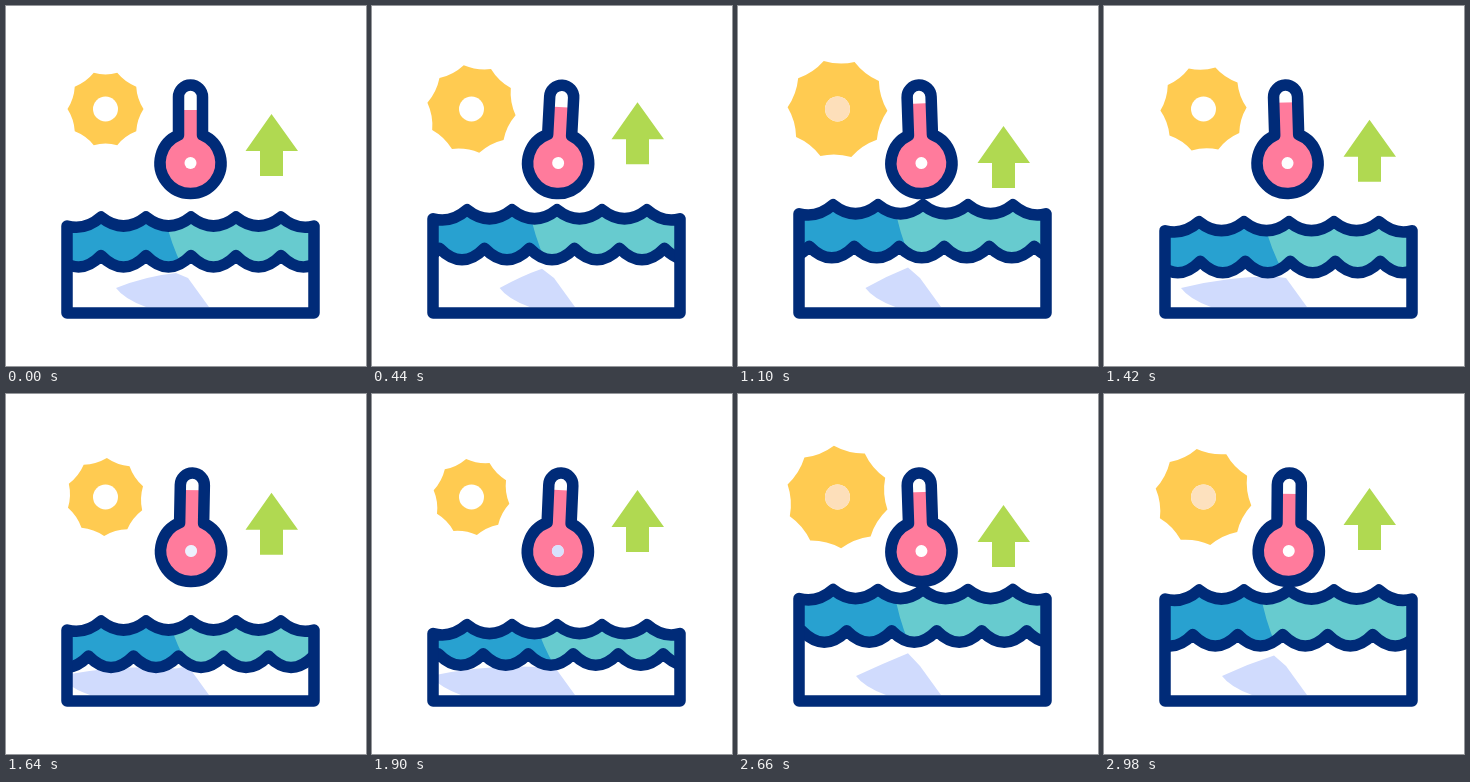
Recreate the animation shown at these times as an HTML page. Size 360 by 360 pixels, loop 3 s.

```html
<!DOCTYPE html>
<html lang="en">
<head>
<meta charset="utf-8">
<title>Rising water temperature</title>
<style>
  html, body { margin: 0; width: 100%; height: 100%; overflow: hidden; background: #fff; }
  svg { display: block; width: 100vw; height: 100vh; }
  .line { fill: none; stroke: #002b78; stroke-width: 11.5; stroke-linejoin: round; stroke-linecap: round; }
</style>
</head>
<body>
<svg viewBox="0 0 360 360">
  <defs>
    <clipPath id="tank"><rect x="61" y="180" width="247" height="121.5"/></clipPath>
    <clipPath id="sea"><path id="seaShape"/></clipPath>
  </defs>

  <g transform="translate(99.5 103)">
    <path id="sun" fill="#ffcb51"/>
    <circle r="12.5" fill="#fff"/>
    <circle id="glow" r="12.5" fill="#fddfba"/>
  </g>

  <path id="arrow" fill="#b0d951" d="M265.5 0L292 37H277V62H254V37H239.5Z"/>

  <g clip-path="url(#tank)">
    <path id="shade" fill="#d0dbfd"/>
    <g clip-path="url(#sea)">
      <rect x="55" y="180" width="260" height="130" fill="#67cbcf"/>
      <path fill="#28a1d0" d="M55 180H155V190Q164 255 203 301H55Z"/>
    </g>
    <path id="lower" class="line"/>
  </g>

  <g id="thermo">
    <path fill="#fff" d="M172.5 129V91a12 12 0 0 1 24 0V129Z"/>
    <rect id="mercury" x="173" width="23" fill="#ff7b9c"/>
    <circle cx="184.5" cy="157" r="30" fill="#ff7b9c"/>
    <path class="line" d="M172.5 129V91a12 12 0 0 1 24 0V129A30.5 30.5 0 1 1 172.5 129Z"/>
    <circle cx="184.5" cy="157" r="6" fill="#fff"/>
    <circle id="tint" cx="184.5" cy="157" r="6" fill="#d0dbfd"/>
  </g>

  <path id="frame" class="line"/>
</svg>
<script>
  const LOOP = 3000, STEP = 20, PITCH = 45;
  const set = (id, name, value) => document.getElementById(id).setAttribute(name, value);
  const ease = p => (1 - Math.cos(Math.PI * p)) / 2;
  const clamp = v => Math.max(0, Math.min(1, v));

  // Eased motion through poses spaced evenly in time.
  function beat(t, span, ...poses) {
    const i = Math.floor(t / span);
    return poses[i] + (poses[i + 1] - poses[i]) * ease(t / span - i);
  }

  function sunPath(r, turn) {
    const spot = (radius, deg) => {
      const a = deg * Math.PI / 180;
      return `${radius * Math.cos(a)} ${radius * Math.sin(a)}`;
    };
    let d = `M${spot(r, turn)}`;
    for (let a = turn; a < turn + 360; a += 36) {
      d += `Q${spot(r * 0.87, a + 18)} ${spot(r, a + 36)}`;
    }
    return d + 'Z';
  }

  // Scallops from crest to crest; dir is 1 or -1.
  function scallops(x, y, sag, count, dir) {
    let d = '';
    for (let i = 0; i < count; i++) {
      d += `Q${x + dir * PITCH / 2} ${y + sag} ${x + dir * PITCH} ${y}`;
      x += dir * PITCH;
    }
    return d;
  }

  function drawSun(t) {
    const r = beat(t, 900, 38, 51.5, 38, 51.5, 38);
    set('sun', 'd', sunPath(r, t / 10));
    set('glow', 'opacity', clamp((r - 47.3) / 1.3));
  }

  function drawThermo(t) {
    const tilt = beat(t, 620, 0, 3.8, -2.8, 2.6, -2.6, 0.8);
    const top = 104 - 8 * Math.sin(Math.PI * t / 3600);
    set('thermo', 'transform', `rotate(${tilt} 184.5 188)`);
    set('mercury', 'y', top);
    set('mercury', 'height', 132 - top);
    set('tint', 'opacity', clamp(1 - Math.abs(t - 2000) / 600));
  }

  function drawWater(t) {
    const y = 211 + beat(t, 920, 0, -15.5, 20, -16.5, -5);
    const crest = `M61 ${y + 9}Q79 ${y + 14} 95 ${y}` + scallops(95, y, 18, 4, 1)
      + `Q291 ${y + 14} 308 ${y + 9}`;
    set('frame', 'd', crest + 'V307H61Z');

    const rise = beat(t, 860, 0, -14, 13, -13, -4);
    const low = 249.5 + rise;
    const left = 5 - (t * PITCH / 720) % PITCH;
    const right = left + 8 * PITCH;
    set('lower', 'd', `M${left} ${low}` + scallops(left, low, 23, 8, 1));
    set('seaShape', 'd', crest + `L${right} ${low}` + scallops(right, low, 23, 8, -1) + 'Z');

    const tip = beat(t, 860, 110, 144, 52, 118, 118);
    set('shade', 'd', `M203 301L182 272L170 ${267 + 0.6 * rise}`
      + `Q${(tip + 170) / 2} 270 ${tip} 282Q${tip + 8} 293 ${tip + 30} 301Z`);
  }

  function draw(t) {
    drawSun(t);
    drawThermo(t);
    drawWater(t);
    set('arrow', 'transform', `translate(0 ${beat(t, 600, 108, 94, 122, 94, 122, 94)})`);
  }

  function tick() {
    const t = performance.now() % LOOP;
    draw(Math.floor(t / STEP) * STEP);
    requestAnimationFrame(tick);
  }
  tick();
</script>
</body>
</html>
```
